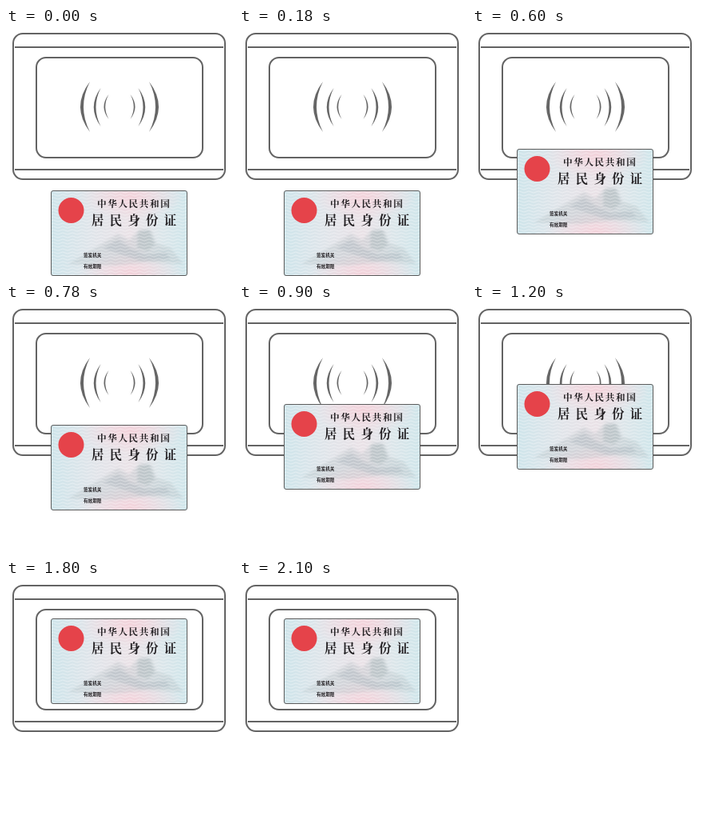
These frames come from a looping animation (284x310 px, 2300 ms). An HTML page:

```html
<!DOCTYPE html>
<html lang="en">
<head>
<meta charset="utf-8">
<title>Card on reader</title>
<style>
  html, body { margin: 0; width: 100%; height: 100%; overflow: hidden; background: #fff; }
  svg { display: block; }
  .line { fill: none; stroke: #636363; stroke-width: 2; }
  .wave { fill: #666; }
  text { font-family: "Noto Serif CJK SC", "Noto Sans CJK SC", "Noto Sans CJK", serif; font-weight: 700; fill: #221f22; }
  .country { font-size: 11.6px; letter-spacing: 1.6px; }
  .title { font-size: 15.4px; letter-spacing: 7.3px; }
  .small { font-size: 5.6px; font-family: "Noto Sans CJK SC", "Noto Sans CJK", sans-serif; }

  /* The card jumps upward in hard steps, then rests on the screen */
  .card { animation: slide 2300ms step-end infinite; }
  @keyframes slide {
    0% { transform: translate(56px, 203px); }
    13.043% { transform: translate(56px, 177px); }
    26.086% { transform: translate(56px, 151px); }
    39.13% { transform: translate(56px, 125px); }
    52.173% { transform: translate(56px, 100px); }
    65.217% { transform: translate(56px, 74px); }
    78.26%, 100% { transform: translate(56px, 48px); }
  }
</style>
</head>
<body>
<svg width="284" height="310" viewBox="0 0 284 310">
  <defs>
    <linearGradient id="paper">
      <stop offset="0" stop-color="#cfe5eb"/>
      <stop offset=".3" stop-color="#e0e5ea"/>
      <stop offset=".58" stop-color="#eae2e7"/>
      <stop offset=".8" stop-color="#dce6ea"/>
      <stop offset="1" stop-color="#d0e6eb"/>
    </linearGradient>
    <radialGradient id="blush">
      <stop offset="0" stop-color="#f5cfd8" stop-opacity=".8"/>
      <stop offset="1" stop-color="#f5cfd8" stop-opacity="0"/>
    </radialGradient>
    <pattern id="ripple" width="12" height="4" patternUnits="userSpaceOnUse">
      <path d="M0 2Q3 0 6 2T12 2" fill="none" stroke="#fff" stroke-width=".8" opacity=".45"/>
    </pattern>
    <filter id="soft" x="-20%" y="-20%" width="140%" height="140%">
      <feGaussianBlur stdDeviation="1.5"/>
    </filter>
    <clipPath id="edge"><rect width="171" height="107" rx="3"/></clipPath>
    <g id="waves" class="wave">
      <path d="M105 67Q81 98.500 105 130Q89 98.500 105 67Z"/>
      <path d="M118.500 75Q101 99 118.500 123Q106.500 99 118.500 75Z"/>
      <path d="M128.500 83Q116.500 98.500 128.500 114Q120 98.500 128.500 83Z"/>
    </g>
  </defs>

  <rect class="line" x="9" y="7" width="265" height="182" rx="12"/>
  <path class="line" d="M11 24H272M11 177H272"/>
  <rect class="line" x="38" y="37" width="208" height="125" rx="12"/>
  <use href="#waves"/>
  <use href="#waves" transform="translate(284 0) scale(-1 1)"/>

  <g class="card">
    <g clip-path="url(#edge)">
      <rect width="171" height="107" fill="url(#paper)"/>
      <ellipse cx="100" cy="8" rx="65" ry="28" fill="url(#blush)"/>
      <ellipse cx="100" cy="103" rx="65" ry="24" fill="url(#blush)"/>
      <g filter="url(#soft)" fill="#a9b5bb">
        <path d="M22 92L62 68L84 54L98 62L112 48L126 50L132 66L150 72L166 92L120 90L80 94Z" opacity=".3"/>
        <path d="M109 52L123 49L130 68L121 76L108 72Z" opacity=".45"/>
        <path d="M66 72L84 61L100 72L118 80L144 78L150 86L112 88L88 80Z" opacity=".4"/>
      </g>
      <rect width="171" height="107" fill="url(#ripple)"/>
    </g>
    <circle cx="25.500" cy="25" r="16" fill="#e5434a"/>
    <text class="country" x="58" y="20.500">中华人民共和国</text>
    <text class="title" x="51" y="43">居民身份证</text>
    <text class="small" x="41" y="83">签发机关</text>
    <text class="small" x="41" y="96.700">有效期限</text>
    <rect x=".5" y=".5" width="170" height="106" rx="2.500" fill="none" stroke="#5c5c5c"/>
  </g>
</svg>
</body>
</html>
```
